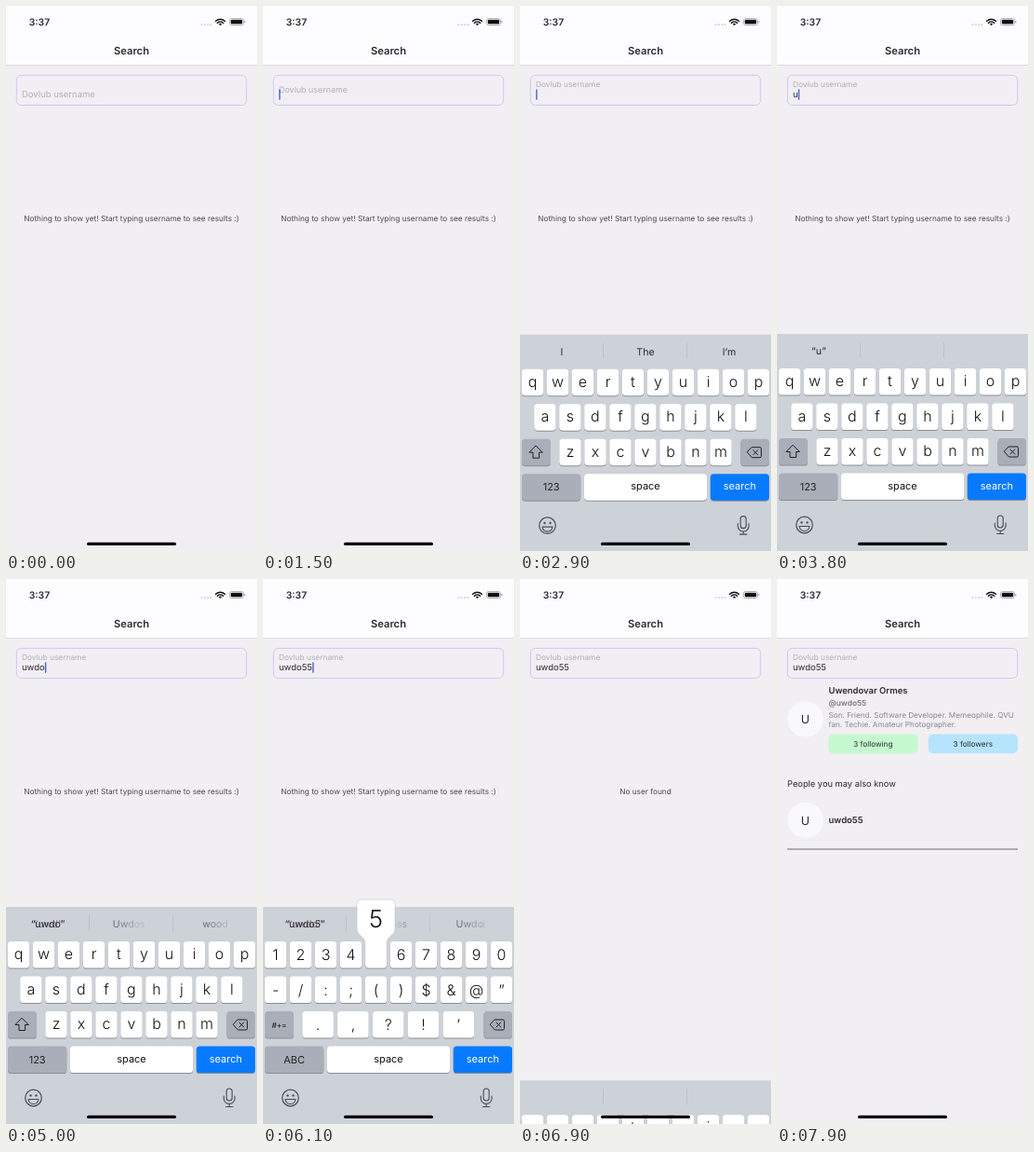
An HTML page that plays this animation: 270x585 px, repeating every 8 s.

```html
<!DOCTYPE html>
<html lang="en">
<head>
<meta charset="utf-8">
<title>User search</title>
<style>
  html, body { margin: 0; height: 100%; overflow: hidden; background: #f1eff2; }
  svg { display: block; width: 100vw; height: 100vh; font-family: Inter, "Liberation Sans", sans-serif; text-rendering: geometricPrecision; }
  text { white-space: pre; }
</style>
</head>
<body>
<svg id="stage" viewBox="0 0 270 585"></svg>
<script>
const LOOP = 8000, STEP = 100;
const USER = 'uwdo55', INK = '#2b2a2e';
const FOCUS = 1400, KEYS_UP = 2557, DIGITS = 5300, SEARCH = 6600, KEYS_DOWN = 6734, DONE = 6800, RESULT = 7700;
const TYPED = [3400, 4000, 4300, 4900, 5900, 6100];
const SUGGESTIONS = [
  [2500, 'I', 'The', 'I’m'],
  [3400, '“u”', '', ''],
  [4000, '“uw”', 'Uw', 'we'],
  [4400, '“uwd”', 'Uwds', 'wd'],
  [4900, '“uwdo”', 'Uwdoss', 'wood'],
  [6000, '“uwdo5”', '', 'Uwdos'],
  [6200, '“uwdo55”', '', ''],
  [DONE, '', '', '']
];
const LETTERS = ['qwertyuiop', 'asdfghjkl', 'zxcvbnm'];
const SYMBOLS = ['1234567890', '-/:;()$&@”', '.,?!’'];
const ROW_Y = [37, 74.5, 112, 149.5], KEY_H = 28.5;

const stage = document.getElementById('stage');
const pen = document.createElement('canvas').getContext('2d');
const clamp = v => Math.max(0, Math.min(1, v));
const easeOut = v => 1 - (1 - clamp(v)) ** 3;
const mix = (a, b, p) => a + (b - a) * p;
const escape = s => s.replace(/&/g, '&amp;');

const text = (s, x, y, size, fill = INK, weight = 400, anchor = 'start') =>
  `<text x="${x}" y="${y}" font-size="${size}" fill="${fill}" font-weight="${weight}" text-anchor="${anchor}">${escape(s)}</text>`;
const centered = (s, x, y, size, fill, weight) => text(s, x, y, size, fill, weight, 'middle');
const rect = (x, y, w, h, fill, r = 0, more = '') =>
  `<rect x="${x}" y="${y}" width="${w}" height="${h}" rx="${r}" fill="${fill}" ${more}/>`;
const line = (d, color = '#222', width = 1) =>
  `<path d="${d}" fill="none" stroke="${color}" stroke-width="${width}" stroke-linejoin="round" stroke-linecap="round"/>`;
const circle = (x, y, r, fill) => `<circle cx="${x}" cy="${y}" r="${r}" fill="${fill}"/>`;

function header() {
  return rect(0, 0, 270, 63, '#fdfcfe') + rect(0, 63, 270, 1, '#dddbe0') +
    text('3:37', 24.7, 20.8, 10.4, INK, 600) + centered('Search', 135, 52, 11.2, INK, 600) +
    [210.5, 214, 217.2, 220.4].map(x => circle(x, 20, .8, '#b5b4b8')).join('') +
    line('M225.6 16.2a7 7 0 0 1 9.8 0M227.4 18.2a4.4 4.4 0 0 1 6.2 0', '#111', 1.5) +
    '<path d="M230.5 21l-1.6-1.7a2.3 2.3 0 0 1 3.2 0z" fill="#111"/>' +
    rect(240.5, 13.5, 15, 7, 'none', 2, 'stroke="#a2a1a5" stroke-width=".8"') +
    rect(241.8, 14.8, 12.4, 4.4, '#111', 1) + rect(256.3, 15.7, 1, 2.6, '#a2a1a5', .5);
}

function field(t) {
  const up = clamp((t - FOCUS + 100) / 400);
  const count = TYPED.filter(at => t >= at).length;
  const typed = USER.slice(0, count);
  let out = rect(11.3, 74.4, 247.4, 32, '#f1eff4', 5, 'stroke="#c8c4f4" stroke-width=".9"') +
    text('Dovlub username', 17, mix(98, 87, up), mix(9.5, 8.35, up), '#b1afb4') +
    text(typed, 17, 98, 9.5);
  if (t >= FOCUS && t < DONE) {
    const since = t - (count ? TYPED[count - 1] : FOCUS), phase = since % 1000;
    const fadeIn = since < 1000 ? 1 : clamp(phase / 200);
    const alpha = Math.min(fadeIn, clamp((800 - phase) / 200));
    pen.font = '9.5px Inter, "Liberation Sans", sans-serif';
    out += rect(17.2 + pen.measureText(typed).width, 89.3, 1.4, 11.4, '#4660d2', .6, `opacity="${alpha}"`);
  }
  return out;
}

function avatar(y) {
  return circle(30.5, y, 19.3, '#f9f8fa') + centered(USER[0].toUpperCase(), 30.5, y + 4.5, 12.5);
}

function results() {
  return avatar(150.5) + text('Uwendovar Ormes', 55.5, 123, 9.45, INK, 600) +
    text('@' + USER, 55.5, 136.3, 8.3, '#7b797e', 600) +
    text('Son. Friend. Software Developer. Memeophile. QVU', 55.5, 149, 8.2, '#8b898e') +
    text('fan. Techie. Amateur Photographer.', 55.5, 159, 8.2, '#8b898e') +
    rect(55.5, 166.5, 96.3, 20.8, '#c5fad0', 5) + centered('3 following', 103.3, 180, 8.2) +
    rect(162.8, 166.5, 96.2, 20.8, '#b6e4fd', 5) + centered('3 followers', 210.8, 180, 8.2) +
    text('People you may also know', 11, 223.3, 9.3) +
    avatar(259) + text(USER, 55.5, 262.4, 9.5, INK, 600) + rect(11, 289.3, 248, 1.4, '#918f94');
}

// Letters of a word appear or vanish one after another.
function wave(word, x, alpha) {
  const spans = [...word].map((c, i) => `<tspan fill-opacity="${clamp(alpha(i))}">${c}</tspan>`).join('');
  return `<text x="${x}" y="22" font-size="10.6" fill="${INK}" text-anchor="middle">${spans}</text>`;
}

function suggestions(t, open) {
  const now = SUGGESTIONS.findLastIndex(s => t >= s[0]);
  if (now < 0) return '';
  const [at, ...words] = SUGGESTIONS[now], age = t - at;
  const old = now > 1 && t < DONE ? SUGGESTIONS[now - 1].slice(1) : ['', '', ''];
  let out = wave(old[0], 45, () => 1 - age / 200) + wave(words[0], 45, () => 1);
  for (const i of [1, 2]) {
    const x = 45 + 90 * i;
    out += wave(old[i], x, n => .3 + n * .1 - age / 200) + wave(words[i], x, n => age / 170 - n * .14);
  }
  const squash = t < 3000 ? open * open : 1;
  return `<g transform="translate(0 ${14 * (1 - squash)}) scale(1 ${squash})">${out}</g>`;
}

function key(x, y, w, label = '', fill = '#fff', size = 16, drop = 19, color = '#111', weight = 300) {
  return rect(x, y + 1, w, KEY_H, '#8b8e94', 3.6) + rect(x, y, w, KEY_H, fill, 3.6) +
    centered(label, x + w / 2, y + drop, size, color, weight);
}

function popup(char, x, y) {
  return `<path d="M${x - 20.5} ${y - 40}q0-5 5-5h31q5 0 5 5v26c0 8-8.8 8-8.8 16v${KEY_H - 6}q0 4-4 4h-15.4q-4 0-4-4v-${KEY_H - 6}c0-8-8.8-8-8.8-16z" fill="#fff" stroke="#b9bcc3" stroke-width=".5"/>` +
    centered(char, x, y - 15.5, 26, '#111', 300);
}

function keyboard(t) {
  const open = easeOut((t - KEYS_UP) / 400), shut = easeOut((t - KEYS_DOWN) / 400);
  if (!open || shut === 1) return '';
  const symbols = t >= DIGITS && t < DONE, rows = symbols ? SYMBOLS : LETTERS;
  const grey = '#a9aeb8', [, , y3, y4] = ROW_Y;
  const pressed = USER[TYPED.findIndex(at => t >= at && t < at + STEP)];
  let bubble = '';
  let out = rect(0, 0, 270, 233, '#cdd1d8') + rect(89, 9, .8, 17, '#b9bdc5') + rect(179, 9, .8, 17, '#b9bdc5') +
    suggestions(t, open);
  rows.forEach((row, r) => {
    const wide = symbols && r === 2, w = wide ? 33.6 : 23.4, pitch = wide ? 37.8 : 27;
    const left = r === 2 ? 42.3 : r === 1 && !symbols ? 15.2 : 1.8;
    [...row].forEach((c, i) => {
      const x = left + pitch * i;
      out += key(x, ROW_Y[r], w, c, '#fff', 16, symbols ? 20.3 : 19);
      if (c === pressed) bubble = popup(c, x + w / 2, ROW_Y[r]);
    });
  });
  out += key(2, y3, 31, symbols ? '#+=' : '', grey, 8.3, 17.5, '#111', 400) + key(237.5, y3, 30.5, '', grey);
  if (!symbols) out += line('M17.3 119.5l7 7h-3.7v6h-6.6v-6h-3.7z');
  out += line('M249.5 121h8.5q1.5 0 1.5 1.5v8q0 1.5-1.5 1.5h-8.5l-5-5.5zM251 124l4.8 5M255.8 124l-4.8 5');
  out += key(2, y4, 63.3, symbols ? 'ABC' : '123', grey, 11, 18.3, '#222', 400) +
    key(69, y4, 132, 'space', '#fff', 11, 17, '#111', 400);
  const active = t >= SEARCH && t < DONE;
  out += key(204.8, y4, 63.2, 'search', active ? '#fff' : '#087aff', 11, 17, active ? '#111' : '#fff', 400);
  out += '<circle cx="29.5" cy="205" r="8.8" fill="none" stroke="#4a4d53" stroke-width="1.2"/>' +
    circle(26.5, 202.4, 1.2, '#4a4d53') + circle(32.5, 202.4, 1.2, '#4a4d53') +
    line('M24 206.5h11q-.8 5-5.5 5t-5.5-5z', '#4a4d53', 1.1) +
    rect(237.2, 195, 6, 13, 'none', 3, 'stroke="#4a4d53" stroke-width="1.1"') +
    line('M234.3 203v2.5a5.9 5.9 0 0 0 11.8 0V203M240.2 211.5v3M236.5 214.5h7.4', '#4a4d53', 1.1);
  return `<g transform="translate(0 ${585 - 233 * (open - shut)})">${out}${bubble}</g>`;
}

function draw(t) {
  const message = t < DONE ? 'Nothing to show yet! Start typing username to see results :)' : 'No user found';
  stage.innerHTML = rect(0, 0, 270, 585, '#f1eff2') + header() + field(t) +
    (t < RESULT ? centered(message, 135, 231, 8.25, '#4a494d') : results()) +
    keyboard(t) + rect(87, 575.7, 96, 3.4, '#000', 1.7);
}

let shown = -1;
function tick() {
  const t = Math.floor(performance.now() % LOOP / STEP) * STEP;
  if (t !== shown) draw(shown = t);
  requestAnimationFrame(tick);
}
tick();
</script>
</body>
</html>
```
